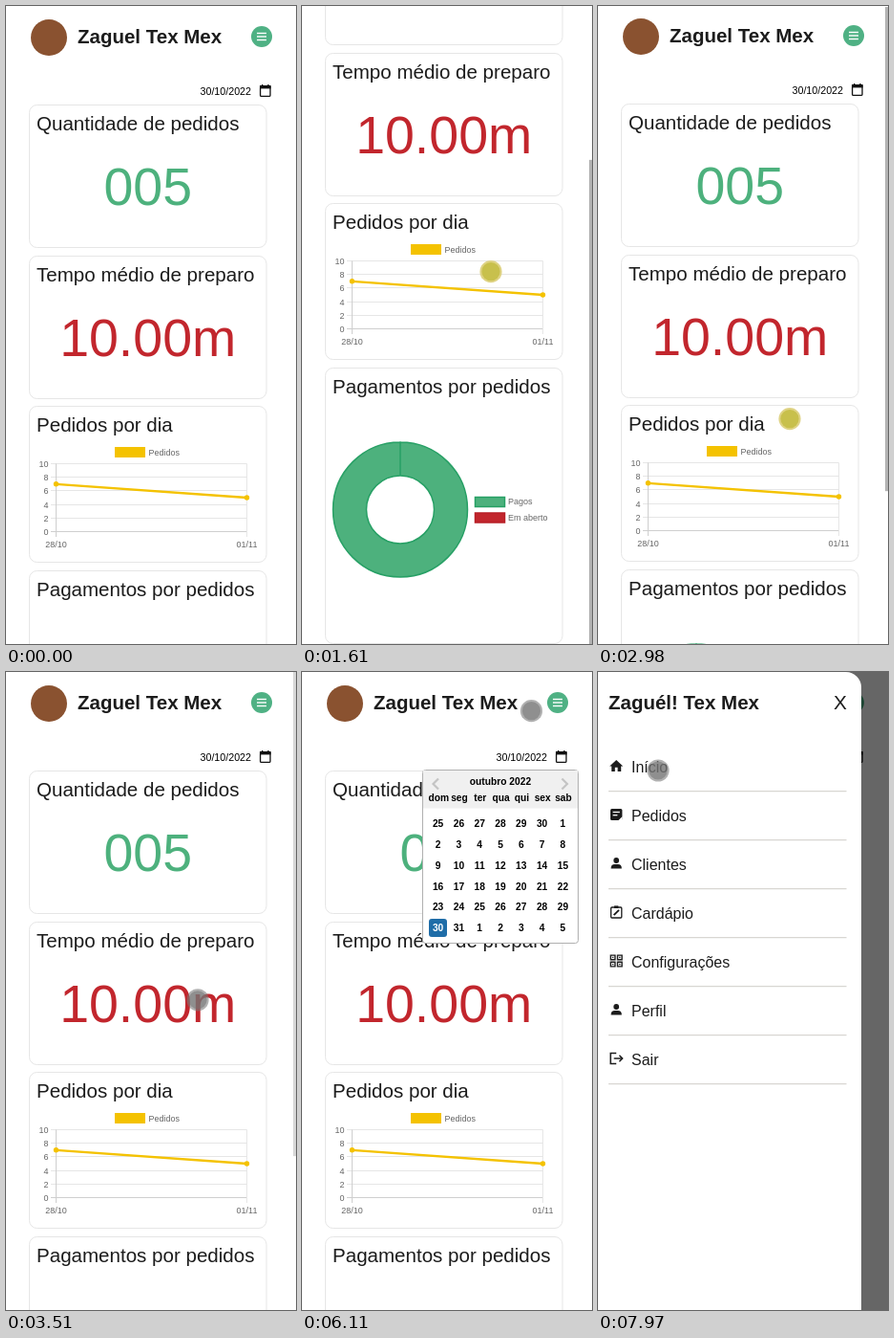
An HTML page with a canvas that plays this animation: 304 by 667 pixels, repeating every 8000 ms.

```html
<!DOCTYPE html>
<html lang="pt">
<head>
<meta charset="utf-8">
<title>Painel de pedidos</title>
<style>
html, body { margin: 0; width: 100%; height: 100%; overflow: hidden; background: #fff; }
canvas { display: block; }
</style>
</head>
<body>
<canvas id="stage" width="304" height="667"></canvas>
<script>
const W = 304, H = 667, LOOP = 8000;
const PAGE_H = 879, MAX_SCROLL = PAGE_H - H;
const GREEN = '#4db17d', RED = '#c2262d', YELLOW = '#f4c200', INK = '#1c1c1c';
const ctx = document.getElementById('stage').getContext('2d');

// Pointer path: time, x, y
const PATH = [
  [0, 264, 603], [240, 264, 603], [990, 178, 500], [1060, 178, 500],
  [1610, 198, 278], [1810, 199, 216], [2220, 198, 211], [2500, 199, 299],
  [3020, 201, 433], [3050, 201, 433], [3510, 201, 343], [3860, 201, 272],
  [4350, 238, 81], [4730, 238, 81], [4940, 168, 84], [5210, 137, 83],
  [5560, 137, 83], [6320, 264, 31], [6850, 264, 32], [7350, 143, 110],
  [7420, 143, 110], [7960, 63, 103], [8000, 63, 103]
];
const PRESSES = [[1040, 1840], [2180, 3030], [4400, 4480], [6580, 6680]];
const CLICK_DATE = 4500, CLICK_MENU = 6640;

const clamp = (v, lo = 0, hi = 1) => Math.min(hi, Math.max(lo, v));
const ramp = (t, from, to) => clamp((t - from) / (to - from));

function slope(i, k) {
  if (i < 1 || i > PATH.length - 2) return 0;
  const rate = j => (PATH[j + 1][k] - PATH[j][k]) / (PATH[j + 1][0] - PATH[j][0]);
  const a = rate(i - 1), b = rate(i);
  return a * b > 0 ? 2 * a * b / (a + b) : 0;
}

// Monotone cubic through the path points
function pointer(t, k) {
  let i = 0;
  while (i < PATH.length - 2 && t >= PATH[i + 1][0]) i++;
  const p = PATH[i], q = PATH[i + 1], span = q[0] - p[0];
  const u = (t - p[0]) / span, v = 1 - u;
  return p[k] * (1 + 2 * u) * v * v + slope(i, k) * span * u * v * v
    + q[k] * u * u * (3 - 2 * u) - slope(i + 1, k) * span * u * u * v;
}

function scrollAt(t) {
  if (t < 1060 || t > 3020) return 0;
  const grip = t < 2000 ? 490 : 433;
  return clamp(grip - pointer(t, 2), 0, MAX_SCROLL);
}

function text(str, x, y, size, color = INK, align = 'left', weight = '') {
  ctx.font = `${weight} ${size}px "Liberation Sans", Arial, sans-serif`;
  ctx.textAlign = align;
  ctx.fillStyle = color;
  ctx.fillText(str, x, y);
}

function rect(x, y, w, h, color) {
  ctx.fillStyle = color;
  ctx.fillRect(x, y, w, h);
}

function disc(x, y, r, color) {
  ctx.fillStyle = color;
  ctx.beginPath();
  ctx.arc(x, y, r, 0, 7);
  ctx.fill();
}

function line(color, width, ...pts) {
  ctx.strokeStyle = color;
  ctx.lineWidth = width;
  ctx.beginPath();
  for (let i = 0; i < pts.length; i += 2) ctx.lineTo(pts[i], pts[i + 1]);
  ctx.stroke();
}

function box(x, y, w, h, r, fill, stroke, width = 1) {
  ctx.beginPath();
  ctx.roundRect(x, y, w, h, r);
  if (fill) { ctx.fillStyle = fill; ctx.fill(); }
  if (stroke) { ctx.strokeStyle = stroke; ctx.lineWidth = width; ctx.stroke(); }
}

function card(y, h, title) {
  box(24.5, y + .5, 248.5, h - 1, 8, '#fff', '#e6e6e6');
  text(title, 32, y + 27, 20.55);
}

function header() {
  disc(45, 33, 19, '#8a5230');
  text('Zaguel Tex Mex', 75, 39, 20.5, INK, 'left', 'bold');
  disc(268, 32, 11, '#4fb184');
  for (const y of [28.5, 32, 35.5]) line('#fff', 1.4, 263, y, 273, y);
  text('30/10/2022', 203.5, 93, 10.7, '#000');
  box(266.6, 83.6, 10.4, 10.8, 1, null, '#111', 1.3);
  rect(266, 83, 11.6, 3.4, '#111');
  rect(268, 82, 1.4, 2, '#111');
  rect(274.2, 82, 1.4, 2, '#111');
}

function lineChart() {
  const x0 = 52.5, x1 = 252.5, yAt = v => 549.5 - v * 7.1;
  rect(114, 461, 32, 11, YELLOW);
  text('Pedidos', 149.5, 469.5, 9, '#666');
  for (let v = 0; v <= 10; v += 2) {
    const y = Math.floor(yAt(v)) + .5;
    line(v ? '#e6e6e6' : '#cfcfcf', 1, 47, y, x1, y);
    text(v, 44.5, y + 3, 9, '#666', 'right');
  }
  line('#cfcfcf', 1, x0, 478.5, x0, 555);
  line('#e6e6e6', 1, x1, 478.5, x1, 555);
  text('28/10', x0, 566, 9, '#666', 'center');
  text('01/11', x1, 566, 9, '#666', 'center');
  line(YELLOW, 2.3, x0, yAt(7), x1, yAt(5));
  disc(x0, yAt(7), 2.7, YELLOW);
  disc(x1, yAt(5), 2.7, YELLOW);
}

function doughnut() {
  const cx = 103, cy = 738.5, edge = '#27a065';
  ctx.beginPath();
  ctx.arc(cx, cy, 70.5, -Math.PI / 2, Math.PI * 1.5);
  ctx.arc(cx, cy, 35.5, Math.PI * 1.5, -Math.PI / 2, true);
  ctx.closePath();
  ctx.fillStyle = GREEN;
  ctx.fill();
  ctx.strokeStyle = edge;
  ctx.lineWidth = 1.5;
  ctx.stroke();
  box(181.5, 725.5, 31, 10, 0, GREEN, edge, 1.5);
  text('Pagos', 216, 733.3, 9, '#666');
  box(181.5, 742, 31, 10, 0, RED, '#b81f27', 1.5);
  text('Em aberto', 216, 750, 9, '#666');
}

function page() {
  header();
  card(103, 150, 'Quantidade de pedidos');
  text('005', 148.7, 207.5, 55.5, GREEN, 'center');
  card(261, 150, 'Tempo médio de preparo');
  text('10.00m', 148.7, 365.5, 55.5, RED, 'center');
  card(418, 164, 'Pedidos por dia');
  lineChart();
  card(590, 289, 'Pagamentos por pedidos');
  doughnut();
}

function calendar() {
  const colX = i => 142.6 + 21.8 * i;
  box(126.5, 102.5, 163, 181, 3, '#fff', '#b0b0b0');
  rect(127, 103, 162, 39.5, '#f0f0f0');
  line('#c4c4c4', 2.2, 143, 111.5, 137.5, 117, 143, 122.5);
  line('#c4c4c4', 2.2, 272.5, 111.5, 278, 117, 272.5, 122.5);
  text('outubro 2022', 208, 118, 10.24, '#000', 'center', 'bold');
  'dom seg ter qua qui sex sab'.split(' ').forEach((d, i) =>
    text(d, colX(i) + .6, 135, 10.24, '#000', 'center', 'bold'));
  for (let i = 0; i < 42; i++) {
    const x = colX(i % 7), y = 158.3 + 21.85 * Math.floor(i / 7);
    const picked = i === 35;
    if (picked) box(x - 9.6, y - 9.6, 19, 19, 3, '#1f6da8');
    const day = new Date(2022, 8, 25 + i).getDate();
    text(day, x, y + 3.7, 10.24, picked ? '#fff' : '#000', 'center', 'bold');
  }
}

function poly(...pts) {
  ctx.beginPath();
  for (let i = 0; i < pts.length; i += 2) ctx.lineTo(pts[i], pts[i + 1]);
  ctx.fillStyle = INK;
  ctx.fill();
}

function person() {
  disc(0, -3, 2.9, INK);
  box(-5.6, 1, 11.2, 4.6, [4, 4, 0, 0], INK);
}

// Icons are centred on the origin
const ICONS = {
  'Início'() {
    poly(0, -6, 7, .5, 5, .5, 5, 6, 1.4, 6, 1.4, 1.8, -1.4, 1.8, -1.4, 6, -5, 6, -5, .5, -7, .5);
  },
  'Pedidos'() {
    ctx.beginPath();
    ctx.roundRect(-6.2, -6, 12.4, 12, 1.5);
    ctx.fillStyle = INK;
    ctx.fill();
    line('#fff', 1.3, -3.6, -2.5, 3.6, -2.5);
    line('#fff', 1.3, -3.6, .7, 1.2, .7);
    ctx.fillStyle = '#fff';
    ctx.beginPath();
    ctx.moveTo(6.4, 2);
    ctx.lineTo(6.4, 6.2);
    ctx.lineTo(2, 6.2);
    ctx.fill();
    poly(1.6, 1.6, 5.6, 1.6, 1.6, 5.6);
  },
  'Clientes': person,
  'Cardápio'() {
    box(-5.6, -5, 11.2, 11, 1, null, INK, 1.3);
    rect(-2.2, -6.6, 4.4, 2.6, INK);
    line(INK, 1.9, -2.6, 3.2, 2.8, -2.2);
  },
  'Configurações'() {
    for (const x of [-3.6, 3.6]) for (const y of [-3.6, 3.6]) {
      box(x - 2.3, y - 2.3, 4.6, 4.6, 0, null, INK, 1.4);
      rect(x - .7, y - .7, 1.4, 1.4, INK);
    }
  },
  'Perfil': person,
  'Sair'() {
    line(INK, 1.5, 0, -5.4, -6, -5.4, -6, 5.4, 0, 5.4);
    line(INK, 1.5, -2.5, 0, 6, 0);
    line(INK, 1.5, 3.2, -3.2, 6.4, 0, 3.2, 3.2);
  }
};

function drawer(t) {
  if (t < CLICK_MENU) return;
  const open = 1 - (1 - ramp(t, CLICK_MENU, CLICK_MENU + 550)) ** 2;
  rect(0, 0, W, H, 'rgba(0,0,0,.6)');
  ctx.save();
  ctx.translate(-276 * (1 - open), 0);
  box(0, 0, 276, H, [0, 16, 0, 0], '#fff');
  ctx.globalAlpha = .5 + .5 * open;
  text('Zaguél! Tex Mex', 11, 39, 20.5, INK, 'left', 'bold');
  text('X', 254, 39, 20.8, INK, 'center');
  Object.entries(ICONS).forEach(([label, icon], i) => {
    const y = 99 + 51 * i;
    text(label, 35, y + 6, 16);
    line('#d8d6d2', 1.3, 11, y + 25.7, 260.5, y + 25.7);
    ctx.save();
    ctx.translate(19.2, y - 1);
    icon();
    ctx.restore();
  });
  ctx.restore();
}

function scrollbar(t, scroll) {
  ctx.globalAlpha = ramp(t, 1050, 1110) * (1 - ramp(t, 3250, 3790));
  rect(301, scroll * H / PAGE_H, 3, H * H / PAGE_H, '#b4b4b4');
  ctx.globalAlpha = 1;
}

function cursor(t) {
  if (t < 70) return;
  const x = pointer(t, 1), y = pointer(t, 2);
  const down = PRESSES.some(([a, b]) => t >= a && t < b);
  disc(x, y, 11.6, down ? 'rgba(220,206,120,.9)' : 'rgba(120,120,120,.58)');
  disc(x, y, 9.6, down ? 'rgba(198,190,72,.92)' : 'rgba(115,115,115,.55)');
}

function draw(t) {
  const scroll = scrollAt(t);
  rect(0, 0, W, H, '#fff');
  ctx.save();
  ctx.translate(0, -Math.round(scroll));
  page();
  ctx.restore();
  scrollbar(t, scroll);
  if (t >= CLICK_DATE && t < CLICK_MENU) {
    calendar();
    if (Math.floor((t - CLICK_DATE) / 530) % 2 === 0) rect(238, 83, 1, 13, '#000');
  }
  drawer(t);
  cursor(t);
}

const start = performance.now();
function tick() {
  draw((performance.now() - start) % LOOP);
  requestAnimationFrame(tick);
}
tick();
</script>
</body>
</html>
```
